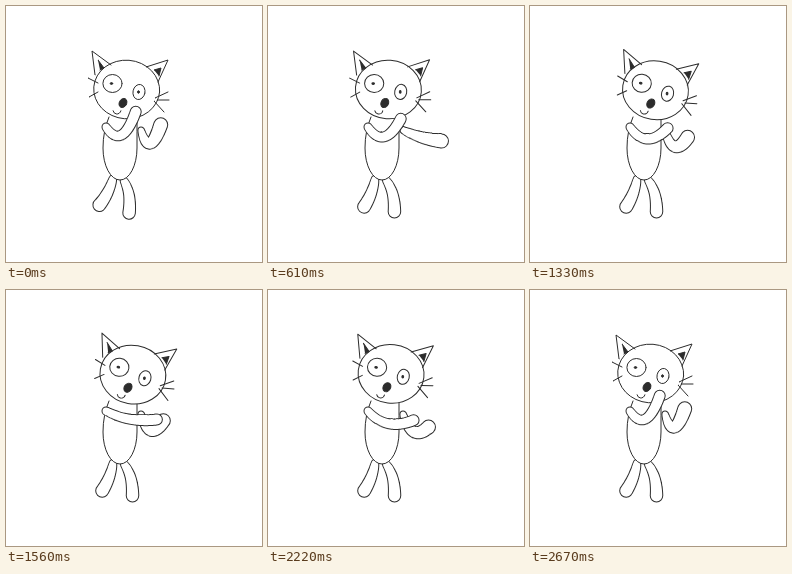
Animation, 256 px wide and 256 px high, one loop 2730 ms. Source, as an HTML page with a canvas:

```html
<!DOCTYPE html>
<html lang="en">
<head>
<meta charset="utf-8">
<title>Dancing cat</title>
<style>
html, body { margin: 0; width: 100%; height: 100%; overflow: hidden; background: #fff; }
canvas { display: block; width: 256px; height: 256px; }
</style>
</head>
<body>
<canvas id="stage" width="256" height="256"></canvas>
<script>
const canvas = document.getElementById('stage');
const ctx = canvas.getContext('2d');
const ratio = window.devicePixelRatio || 1;
canvas.width = canvas.height = 256 * ratio;

const LOOP = 2730, STEP = 500 / 9, LAST = 48;
const INK = '#2c2c2c', PAPER = '#fff';

const mix = (a, b, u) => a.map((v, i) => v + (b[i] - v) * u);
const bend = (a, b, c, u) => mix(mix(a, b, u), mix(b, c, u), u);

// The paw travels along an arc; the elbow straightens near full stretch.
const nearArm = {
  shoulder: [100, 121], paw: [[130, 105], [144, 140], [154, 127]],
  elbow: [[116, 145], [127, 125]], radii: [4, 5.5]
};
const farArm = {
  shoulder: [135, 124], paw: [[155, 118], [159.5, 149.5], [174, 135]],
  elbow: [[143, 154], [153, 133]], radii: [3, 7]
};

function paint(fill) {
  if (fill) {
    ctx.fillStyle = fill;
    ctx.fill();
  }
  ctx.stroke();
}

function line(points, fill) {
  ctx.beginPath();
  points.forEach(p => ctx.lineTo(...p));
  paint(fill);
}

function oval(x, y, rx, ry, tilt = 0, fill = '') {
  ctx.beginPath();
  ctx.ellipse(x, y, rx, ry, tilt, 0, 2 * Math.PI);
  paint(fill);
}

// A bent limb that widens from r0 to r1: an ink silhouette with paper inside.
function limb(start, elbow, end, [r0, r1]) {
  for (const [fill, edge] of [[INK, .5], [PAPER, -.5]]) {
    ctx.beginPath();
    for (let u = 0; u <= 1; u += .01) {
      const [x, y] = bend(start, elbow, end, u);
      const r = r0 + (r1 - r0) * u ** .6 + edge;
      ctx.moveTo(x + r, y);
      ctx.arc(x, y, r, 0, 2 * Math.PI);
    }
    ctx.fillStyle = fill;
    ctx.fill();
  }
}

function arm({ shoulder, elbow, paw, radii }, stretch) {
  limb(shoulder, mix(...elbow, stretch ** 4), bend(...paw, stretch), radii);
}

function turned(x, y, angle, draw) {
  ctx.save();
  ctx.translate(x, y);
  ctx.rotate(angle);
  ctx.translate(-x, -y);
  draw();
  ctx.restore();
}

function legs() {
  limb([107, 173], [105, 187], [96, 201], [3.5, 6.5]);
  limb([118, 174], [127, 186], [126.5, 206], [3.5, 6.3]);
}

function body() {
  ctx.beginPath();
  ctx.moveTo(103, 111);
  ctx.quadraticCurveTo(97, 125, 97, 142);
  ctx.ellipse(114, 142, 17, 32, 0, Math.PI, 0, true);
  ctx.quadraticCurveTo(131, 125, 131, 111);
  paint(PAPER);
}

function head() {
  oval(120.7, 83.5, 33, 29.3, .08, PAPER);
  line([[89, 69], [86, 45], [105, 59]]);
  line([[140, 61], [162, 54], [152, 76]]);
  line([[92, 54], [98, 62], [94, 64]], INK);
  line([[148, 64], [155, 62], [153, 70]], INK);
  oval(106.5, 77.5, 9.6, 9);
  oval(105.5, 77.5, 1.3, .9, 0, INK);
  oval(133, 86, 6, 7.6, .2);
  oval(132.5, 86, .9, 1.3, 0, INK);
  oval(117, 97, 3.7, 4.8, .5, INK);
  ctx.beginPath();
  ctx.arc(111, 104, 4, .2, Math.PI - .2);
  paint();
  line([[82, 72], [92, 77]]);
  line([[83, 91], [92, 86]]);
  line([[149, 92], [162, 86]]);
  line([[151, 94], [163, 94]]);
  line([[148, 95], [158, 106]]);
}

function frame(now) {
  const step = Math.min(LAST, Math.floor((now % LOOP + 6) / STEP));
  const beat = step * Math.PI / 12;
  const drift = Math.sin(beat / 4) ** 4;

  ctx.setTransform(ratio, 0, 0, ratio, 0, 0);
  ctx.fillStyle = PAPER;
  ctx.fillRect(0, 0, 256, 256);
  ctx.strokeStyle = INK;
  ctx.lineCap = ctx.lineJoin = 'round';

  arm(farArm, Math.sin(beat / 2) ** 6 + .25 * drift);
  turned(112, 172, .1 * Math.exp(-step / 3), legs);
  body();
  turned(112, 150, .072 * drift + .036 * Math.sin(2 * beat), head);
  arm(nearArm, .82 * Math.sin(beat) ** 2 + .3 * drift);
}

const start = performance.now();
function tick() {
  frame(performance.now() - start);
  requestAnimationFrame(tick);
}
tick();
</script>
</body>
</html>
```
